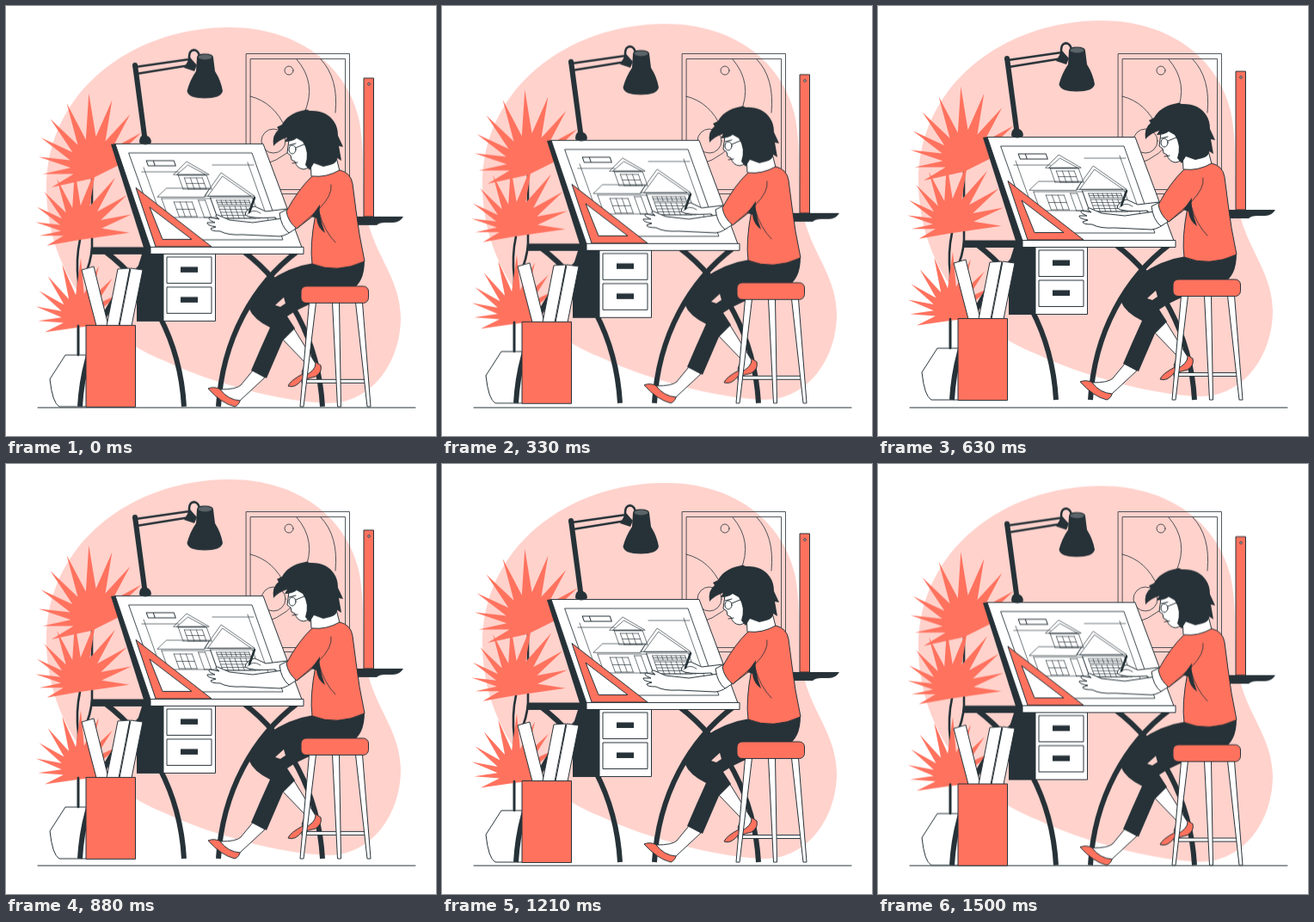
Animation, 500 px wide and 500 px high, one loop 1.54 s. Source, as an HTML page:

```html
<!DOCTYPE html>
<html lang="en">
<head>
<meta charset="utf-8">
<title>Drafting table</title>
<style>
  html, body { margin: 0; width: 100%; height: 100%; overflow: hidden; background: #fff; }
  svg { display: block; width: 100vw; height: 100vh; }
  .float { animation: float 1540ms linear infinite; }
  @keyframes float {
    0%, 100% { transform: translateY(0); }
    46.4% { transform: translateY(-9.2px); }
    97.4% { transform: translateY(.5px); }
  }
  .ink { fill: #263238; }
  .coral { fill: #ff725e; }
  .pink { fill: #ffd2cc; }
  .white { fill: #fff; }
  .edge { stroke: #263238; stroke-linejoin: round; }
  .line { fill: none; stroke: #263238; stroke-linecap: round; stroke-linejoin: round; }
  .thin { stroke-width: .8; }
  .hair { stroke-width: .6; }
  .bold { stroke-width: 2.6; }
  .leg { stroke-width: 6; stroke-linecap: butt; }
</style>
</head>
<body>
<svg viewBox="0 0 500 500">
  <path class="float pink" d="M260 25C338 25 395 68 410 130C420 178 410 220 424 262C436 298 458 322 459 362C459 415 425 462 375 462C320 461 235 437 185 413C100 380 47 300 47 212C47 100 146 25 260 25Z"/>

  <!-- wall picture and floor stay still -->
  <g class="line thin">
    <path d="M279.500 55.500H399.500V218.500H279.500ZM284.500 61.500H394.500V213.500H284.500Z"/>
    <circle cx="329" cy="75" r="5"/>
    <circle cx="311" cy="157" r="14"/>
    <path d="M338 62Q362 90 347 124M284 105Q312 112 325 142M366 62Q387 84 383 124M284 188Q318 183 336 162"/>
  </g>
  <path class="line" d="M37 467H476"/>

  <g class="float">
    <!-- shelf and ruler -->
    <path class="ink" d="M400 245H462Q458 252 450 252H441Q434 252 431 255H400Z"/>
    <rect class="coral edge" x="416" y="84" width="11.500" height="161"/>
    <circle class="white edge" cx="422" cy="91" r="1.300"/>

    <!-- plant -->
    <path class="line bold" d="M100 195V270Q101 290 94 308M86 272Q81 295 84 320V408"/>
    <g id="fans" class="coral"></g>
    <path class="white edge" d="M69 406H94V466H62Q54 462 51 434Z"/>

    <!-- table frame -->
    <g id="trestles" class="line leg"></g>
    <path class="line bold" d="M84 372V406"/>
    <path class="ink" d="M99 280.500H183V367H152V308L158 289H99Z"/>
    <rect class="white edge" x="183" y="288" width="60.500" height="78.500"/>
    <g id="drawers"></g>

    <!-- board -->
    <path class="ink" d="M122 161L128 160L172 281H160Z"/>
    <path class="white edge" d="M127 160.500H299L344 281H168Z"/>
    <rect class="white edge" x="168" y="280.500" width="178" height="8"/>
    <g class="line" transform="translate(143 171) skewX(19.600)">
      <path class="thin" d="M0 0H143V101H0Z"/>
      <path d="M17 9H49V15H17ZM25 9V15"/>
      <path id="house" class="hair"/>
    </g>
    <path class="coral edge" d="M151 211.500L174 280H239Z"/>
    <path class="white edge" d="M167 234L182 271.500H216Z"/>

    <!-- lamp -->
    <path class="ink" d="M147 69L153 68L164 151Q169 153 169 159Q162 164 155 159Q155 153 158 151Z"/>
    <circle class="ink" cx="150" cy="69" r="3"/>
    <path class="line bold" d="M151 71L214 62M152 79L214 69M213 72V59C213 49 223 49 225 58"/>
    <path class="ink" d="M207 72L214 60L222 69L219 76Z"/>
    <path class="ink" d="M222 60Q222 55.500 231 55.500Q241 55.500 241 60L243 76Q250 87 252 99Q250 107.500 231 107.500Q212 107.500 210.500 99Q214 86 221 76Z"/>
    <ellipse cx="231.500" cy="59.500" rx="8" ry="3" fill="#5b6468"/>

    <!-- drawing tubes -->
    <g id="tubes" class="white edge"></g>
    <rect class="coral edge" x="93" y="371.500" width="57.500" height="95"/>

    <!-- legs and shoes -->
    <g class="coral edge">
      <path d="M235 445Q242 442 250 446L273 455Q272 464 266 466Q250 462 235 445Z"/>
      <path d="M358 413L366 418Q368 426 360 431L344 435Q336 445 328 442Q330 436 345 428Z"/>
    </g>
    <g class="white edge">
      <path d="M287 424L301 432L272 459Q258 458 249 446Q268 446 273 441Z"/>
      <path d="M320 386L334 374L360 416Q360 424 346 431L344 426L348 415Z"/>
    </g>
    <path class="ink" d="M358 299Q330 303 304 321Q281 338 282 351Q288 365 307 374Q296 398 285 424L303 433L322 389L336 375L327 361Q350 345 400 331Q417 323 417 296Z"/>
    <path class="pink" d="M313 348L323 339L325 346L319 350Z"/>

    <!-- stool -->
    <g id="stool" class="white edge"><path d="M344 434.500H420V438.500H344Z"/></g>
    <rect class="coral edge" x="343" y="326" width="78.500" height="19.500" rx="6"/>

    <!-- arms -->
    <path class="white edge" d="M327 236L302 239L289 233Q279 236 278 243Q284 248 313 246L331 262Z"/>
    <path class="line bold" d="M283 240L289 223"/>
    <path class="line thin" d="M281 242Q287 235 296 241"/>
    <path class="white edge" d="M328 246L287 252L260 249L246 243Q241 243 248 248L237 246Q233 248 243 252L234 252Q233 255 244 257L238 259Q238 262 249 262Q258 267 275 266L318 268Q328 267 336 258Z"/>
    <path class="white edge" d="M328 236L318 241Q320 257 329 264L337 259Z"/>

    <!-- torso -->
    <path class="white edge" d="M354 178L355 198L366 204L388 192L384 176Z"/>
    <path class="coral edge" d="M356 198Q372 200 388 191Q401 194 403 207L407 238L411 266L417 297Q385 312 356 300Q353 278 360 242L338 259Q328 251 326 239Q340 213 356 198Z"/>
    <path class="ink" d="M355 245L365 231Q363 243 371 264Q362 258 361 247Z"/>
    <path class="line thin" d="M378 208Q380 220 364 236L338 259M364 240Q370 262 383 275"/>

    <!-- head -->
    <path class="white edge" d="M330 148L327 171L331 174L332 179L336 181Q338 189 346 190Q354 189 360 178L352 148Z"/>
    <path class="ink" d="M311 163Q309 150 317 144L315 141L321 138Q328 125 346 121.500L350 120.500L353 122Q372 121 381 134Q386 141 386 151L392 164L387 163L390 180L385 177Q385 183 377 185L369 187L358 183L353 191L348 185Q353 170 345 158L338 154Q333 158 324 158L327 153Q317 156 311 163Z"/>
    <g class="line">
      <ellipse cx="333" cy="167" rx="4" ry="5"/>
      <path d="M337 165L349 160M329 162L337 160M333 183L339 182"/>
    </g>
  </g>
</svg>
<script>
  const $ = id => document.getElementById(id);
  const fill = (id, parts) => $(id).insertAdjacentHTML('beforeend', parts.join(''));
  const path = d => `<path d="${d}"/>`;
  const rect = (x, y, w, h, cls) => `<rect class="${cls}" x="${x}" y="${y}" width="${w}" height="${h}"/>`;

  // Palm leaf: even spikes that shorten away from the upright one; angles in degrees.
  function fan(x, y, size, first, count, lean = 0) {
    const step = 18.6, notch = .43;
    const at = (deg, r) => {
      const a = deg * Math.PI / 180;
      return [x + r * Math.sin(a), y - r * Math.cos(a)];
    };
    const pts = [];
    for (let i = 0; i < count; i++) {
      const deg = first + i * step;
      const r = size * (1 - .0037 * Math.abs(deg - lean));
      pts.push(at(deg, r), at(deg + step / 2, r * notch));
    }
    pts[pts.length - 1] = [x, y + size * .12];
    return `<polygon points="${pts.join(' ')}"/>`;
  }
  fill('fans', [fan(100, 190, 89, -114, 11), fan(83, 263, 80, -114, 12, 25), fan(85, 365, 72, -110, 12)]);

  // Each trestle is one curved leg and its mirror image.
  fill('trestles', [0, 161].flatMap(dx => [1, -1].map(side =>
    `<g transform="translate(${146.5 + dx}) scale(${side} 1)">${path('M32 285C-20 324 -56 388 -60.500 466')}</g>`)));

  fill('drawers', [292, 327].flatMap(y => [
    rect(187, y, 52, 30.5, 'white edge'), rect(203, y + 11.5, 20, 6.5, 'ink')]));

  fill('tubes', [[88, 17], [130, -13], [145, -13]].map(([x, slant], i) =>
    path(`M${x} ${307 - i}l14 ${3 * i - 4}L${x + slant + 14} 372h-14Z`)));

  // Stool legs splay outwards from the seat.
  fill('stool', [-1, 0, 1].map(k => {
    const top = 383.5 + 27 * k, foot = 383 + 39 * k + 4.5 * (1 - k * k);
    return path(`M${top - 4} 345h8L${foot + 2} 466h-4Z`);
  }));

  const grid = (x, y, w, h, cols, rows) => {
    let d = '';
    for (let i = 0; i <= cols; i++) d += `M${x + w * i / cols} ${y}v${h}`;
    for (let i = 0; i <= rows; i++) d += `M${x} ${y + h * i / rows}h${w}`;
    return d;
  };
  const gable = (x, y, w, h) => [0, 4].map(inset =>
    `M${x + inset} ${y}L${x + w / 2} ${y - h + inset}L${x + w - inset} ${y}Z`).join('');
  $('house').setAttribute('d', [
    gable(43, 25, 41, 15), grid(48, 26, 33, 16, 1, 1), grid(54, 29, 21, 13, 3, 2),
    'M15 51L29 41H79L70 51Z', grid(19, 53, 57, 22, 1, 1), grid(32, 57, 21, 17, 3, 2), grid(61, 55, 8, 20, 1, 1),
    gable(70, 50, 58, 27), grid(76, 52, 49, 24, 1, 1), grid(82, 55, 38, 5, 7, 2), grid(82, 62, 38, 14, 6, 4),
    'M7 22H50M92 14H140M134 11V80M11 17V70'
  ].join(''));
</script>
</body>
</html>
```
